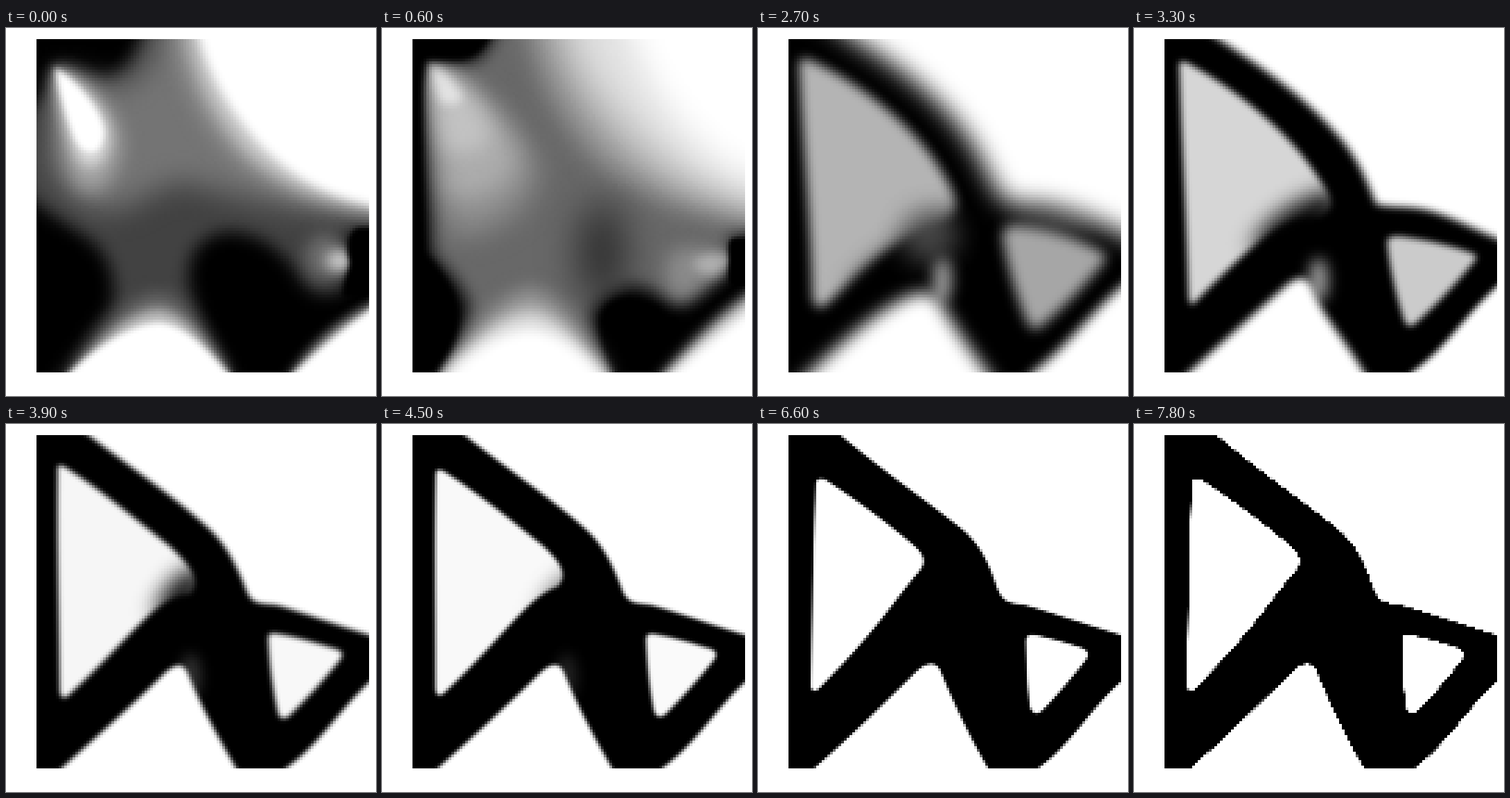
Write an HTML page without scripts that moves like this. It is 534 by 530 pixels and loops after 8000 ms.

```html
<!DOCTYPE html>
<html lang="en">
<head>
<meta charset="utf-8">
<title>Density field settling into a truss</title>
<style>
html, body { margin: 0; width: 100%; height: 100%; overflow: hidden; background: #fff; }
svg { display: block; width: 534px; height: 530px; }
.soft > * { filter: blur(calc(var(--b) * 1px)); }
.truss > *, .early, .start { animation: 8s infinite; }

/* opening fields fade away in hard steps */
.start { animation-name: start; animation-timing-function: step-end; }
@keyframes start { 0% { opacity: 1 } 3.75% { opacity: .42 } 7.5%, 100% { opacity: 0 } }
.early { animation-name: early; animation-timing-function: step-end; }
@keyframes early {
  0%, 7.5% { opacity: 1 } 11.25% { opacity: .93 } 15% { opacity: .88 }
  22.5% { opacity: .65 } 26.25% { opacity: .4 } 30% { opacity: .18 } 33.75%, 100% { opacity: 0 }
}

/* the truss sharpens one step every 300 ms */
.truss > .sky { fill: #fff; animation-name: sky; }
@keyframes sky {
  0%, 33.75% { animation-timing-function: steps(2); filter: blur(18px);
    d: path("M88 -20 L137 16 C206 56 268 106 309 167 C330 202 340 230 354 247 C372 258 388 256 404 255 C442 260 480 273 530 298 L620 340 L620 -60 L88 -60 Z") }
  41.25% { animation-timing-function: steps(2); filter: blur(6px);
    d: path("M80 -12 L120 15 C190 60 242 96 290 150 C323 185 336 220 350 254 C364 259 398 257 420 262 C455 270 490 290 530 306 L620 334 L620 -60 L80 -60 Z") }
  48.75% { animation-timing-function: steps(6); filter: blur(3.5px);
    d: path("M78 -15 L119 16 C190 70 243 105 290 148 C322 176 336 212 350 246 C358 259 366 259 390 261 C430 272 470 288 530 306 L620 330 L620 -60 L78 -60 Z") }
  71.25% { animation-timing-function: steps(7); filter: blur(1.5px);
    d: path("M78 -15 L120 17 C190 75 245 112 290 148 C322 172 335 205 345 235 C354 258 362 258 385 261 C430 274 470 288 530 306 L620 330 L620 -60 L78 -60 Z") }
  97.5%, 100% { filter: blur(.4px);
    d: path("M78 -15 L120 17 C190 75 245 112 290 148 C322 172 335 205 345 235 C354 258 362 258 385 261 C430 274 470 288 530 306 L620 330 L620 -60 L78 -60 Z") }
}
.truss > .big { animation-name: big; }
@keyframes big {
  0%, 33.75% { animation-timing-function: steps(2); filter: blur(8px); fill: #b4b4b4;
    d: path("M60 58 C58 44 66 42 78 48 C150 80 225 143 260 198 C286 240 300 266 265 282 C215 295 172 330 102 396 C90 408 82 404 79 388 C76 270 66 180 60 58 Z") }
  41.25% { animation-timing-function: steps(2); filter: blur(5px); fill: #d6d6d6;
    d: path("M66 60 C64 46 70 48 80 52 C150 90 222 150 259 205 C283 240 298 260 265 271 C215 272 172 312 90 394 C83 402 80 399 79 383 C76 270 70 180 66 60 Z") }
  48.75% { animation-timing-function: steps(6); filter: blur(3.5px); fill: #f6f6f6;
    d: path("M75 70 C74 58 78 58 88 64 C140 97 190 140 235 175 C262 200 285 225 265 245 C215 250 180 310 92 390 C84 398 78 396 78 380 C77 270 74 180 75 70 Z") }
  71.25% { animation-timing-function: steps(7); filter: blur(1.5px); fill: #fff;
    d: path("M84 86 C86 78 93 78 100 82 C150 115 190 145 225 175 C240 188 245 200 232 214 C200 250 175 295 90 380 C84 387 76 386 77 375 C79 270 80 180 84 86 Z") }
  97.5%, 100% { filter: blur(.4px); fill: #fff;
    d: path("M84 86 C86 78 93 78 100 82 C150 115 190 145 225 175 C240 188 245 200 232 214 C200 250 175 295 90 380 C84 387 76 386 77 375 C79 270 80 180 84 86 Z") }
}
.truss > .small { animation-name: small; }
@keyframes small {
  0%, 33.75% { animation-timing-function: steps(2); filter: blur(9px); fill: #a6a6a6;
    d: path("M354 306 C352 284 364 284 380 286 C430 292 470 308 496 322 C506 330 503 336 494 345 C468 376 443 402 412 428 C402 438 394 436 388 422 C376 394 362 350 354 306 Z") }
  41.25% { animation-timing-function: steps(2); filter: blur(5px); fill: #cbcbcb;
    d: path("M366 312 C365 300 374 300 388 301 C425 306 460 314 486 324 C498 328 496 333 488 341 C463 371 438 398 409 424 C400 433 394 431 390 420 C380 390 370 350 366 312 Z") }
  48.75% { animation-timing-function: steps(6); filter: blur(3.5px); fill: #f8f8f8;
    d: path("M379 312 C378 301 384 301 394 303 C425 308 455 318 478 325 C488 329 487 334 482 341 C460 368 435 396 410 420 C402 427 396 426 393 416 C386 385 381 350 379 312 Z") }
  71.25% { animation-timing-function: steps(7); filter: blur(1.5px); fill: #fff;
    d: path("M387 314 C387 304 393 303 404 305 C425 310 448 316 468 323 C478 328 479 333 473 341 C455 364 435 388 411 413 C403 420 397 418 393 408 C389 380 388 350 387 314 Z") }
  97.5%, 100% { filter: blur(.4px); fill: #fff;
    d: path("M387 314 C387 304 393 303 404 305 C425 310 448 316 468 323 C478 328 479 333 473 341 C455 364 435 388 411 413 C403 420 397 418 393 408 C389 380 388 350 387 314 Z") }
}
.truss > .arch { fill: #fff; animation-name: arch; }
@keyframes arch {
  0%, 33.75% { animation-timing-function: steps(2); filter: blur(12px);
    d: path("M40 530 L80 492 C120 456 165 414 208 392 C234 377 254 380 263 395 C280 425 300 455 334 500 L352 530 Z") }
  41.25% { animation-timing-function: steps(2); filter: blur(6px);
    d: path("M46 530 L80 496 C130 452 180 406 222 370 C240 355 251 361 257 375 C271 412 298 440 333 497 L352 530 Z") }
  48.75% { animation-timing-function: steps(6); filter: blur(3px);
    d: path("M46 530 L81 496 C130 452 180 408 230 359 C246 345 255 345 262 358 C278 398 300 440 333 497 L352 530 Z") }
  71.25% { animation-timing-function: steps(7); filter: blur(1.5px);
    d: path("M46 530 L83 495 C130 455 180 405 230 356 C243 344 256 342 263 354 C280 395 300 440 333 497 L352 530 Z") }
  97.5%, 100% { filter: blur(.4px);
    d: path("M46 530 L83 495 C130 455 180 405 230 356 C243 344 256 342 263 354 C280 395 300 440 333 497 L352 530 Z") }
}
.truss > .corner { fill: #fff; animation-name: corner; }
@keyframes corner {
  0%, 33.75% { animation-timing-function: steps(2); filter: blur(8px);
    d: path("M366 530 L400 494 C442 464 482 410 524 374 L600 312 L600 530 Z") }
  41.25% { animation-timing-function: steps(2); filter: blur(4px);
    d: path("M372 530 L402 496 C449 464 481 411 524 373 L600 320 L600 530 Z") }
  48.75% { animation-timing-function: steps(6); filter: blur(3px);
    d: path("M372 530 L405 496 C452 463 482 412 524 373 L600 320 L600 530 Z") }
  71.25% { animation-timing-function: steps(7); filter: blur(1.5px);
    d: path("M372 530 L405 496 C452 463 482 408 524 372 L600 320 L600 530 Z") }
  97.5%, 100% { filter: blur(.4px);
    d: path("M372 530 L405 496 C452 463 482 408 524 372 L600 320 L600 530 Z") }
}

/* soft densities around the struts */
.truss > .shade { filter: blur(16px); animation-name: shade; }
@keyframes shade {
  0%, 33.75% { animation-timing-function: steps(2); opacity: .65; rx: 110px; ry: 24px; transform: translate(225px, 322px) rotate(-33deg) }
  41.25% { animation-timing-function: steps(2); opacity: 1; rx: 74px; ry: 26px; transform: translate(238px, 282px) rotate(-32deg) }
  48.75% { animation-timing-function: steps(6); opacity: 1; rx: 48px; ry: 22px; transform: translate(254px, 246px) rotate(-48deg) }
  71.25%, 100% { opacity: 0; rx: 46px; ry: 20px; transform: translate(285px, 260px) rotate(-48deg) }
}
.truss > .haze { fill: #555; filter: blur(18px); animation-name: haze; }
@keyframes haze {
  0%, 33.75% { animation-timing-function: steps(2); opacity: .8 }
  41.25%, 100% { opacity: 0 }
}
.truss > .glow { fill: #999; filter: blur(10px); animation-name: glow; }
@keyframes glow {
  0%, 41.25% { animation-timing-function: steps(2); opacity: 1 }
  48.75% { animation-timing-function: steps(6); opacity: .35 }
  71.25%, 100% { opacity: 0 }
}
</style>
</head>
<body>
<svg viewBox="0 0 534 530">
  <defs>
    <!-- 4 px cells: sample the middle of each cell, then spread it -->
    <filter id="cells" filterUnits="userSpaceOnUse" x="44" y="16" width="481" height="480" color-interpolation-filters="sRGB">
      <feFlood x="46" y="18" width="1" height="1" flood-color="#000"/>
      <feOffset x="44" y="16" width="4" height="4" dx="0" dy="0"/>
      <feTile result="dots"/>
      <feComposite in="SourceGraphic" in2="dots" operator="in" result="a"/>
      <feOffset in="a" dx="1" result="a1"/>
      <feMerge result="b"><feMergeNode in="a"/><feMergeNode in="a1"/></feMerge>
      <feOffset in="b" dx="-2" result="b2"/>
      <feMerge result="c"><feMergeNode in="b"/><feMergeNode in="b2"/></feMerge>
      <feOffset in="c" dy="1" result="c1"/>
      <feMerge result="d"><feMergeNode in="c"/><feMergeNode in="c1"/></feMerge>
      <feOffset in="d" dy="-2" result="d2"/>
      <feMerge><feMergeNode in="d"/><feMergeNode in="d2"/></feMerge>
    </filter>
  </defs>

  <g filter="url(#cells)">
    <rect width="534" height="530"/>
    <g class="truss">
      <path class="big"/>
      <ellipse class="shade"/>
      <ellipse class="haze" cx="248" cy="300" rx="42" ry="40"/>
      <ellipse class="haze" cx="425" cy="284" rx="62" ry="16"/>
      <path class="sky"/>
      <path class="small"/>
      <ellipse class="glow" cx="267" cy="364" rx="14" ry="32"/>
      <path class="arch"/>
      <path class="corner"/>
    </g>

    <g class="early">
      <rect width="534" height="530"/>
      <g class="soft">
        <path style="--b:12" fill="#686868" d="M172 -30C160 40 140 52 100 56L70 52C70 150 76 250 72 325C92 350 122 372 126 408C115 450 100 475 70 520H345C320 470 306 440 302 420C308 385 340 372 365 370C400 378 425 405 440 398L505 348V296L580 288V-30Z"/>
        <path style="--b:18" fill="#8c8c8c" d="M202 -30C215 60 250 140 320 205C380 250 450 274 580 284V-30Z"/>
        <path style="--b:20" fill="#b8b8b8" d="M232 -30C245 50 280 120 350 186C410 232 470 258 580 274V-30Z"/>
        <path style="--b:22" fill="#e0e0e0" d="M265 -30C280 50 325 110 390 170C440 214 490 238 580 260V-30Z"/>
        <path style="--b:24" fill="#fff" d="M345 -40C365 50 400 110 450 160C490 200 520 218 600 235V-40Z"/>
        <path style="--b:20" fill="#8e8e8e" d="M72 56C130 80 205 140 225 200C228 250 170 300 100 300C80 250 76 150 72 56Z"/>
        <path style="--b:17" fill="#acacac" d="M70 54C120 75 180 130 196 190C190 230 140 252 96 245C82 190 78 120 70 54Z"/>
        <path style="--b:14" fill="#c2c2c2" d="M70 53C110 72 150 120 158 160C140 185 110 185 92 175C82 130 76 90 70 53Z"/>
        <path style="--b:7" fill="#e2e2e2" d="M68 50C90 62 112 84 118 104C108 112 95 112 86 108C78 90 74 70 68 50Z"/>
        <ellipse style="--b:28" fill="#2c2c2c" cx="318" cy="325" rx="34" ry="75"/>
        <path style="--b:13" fill="#8a8a8a" d="M504 334C470 310 430 312 412 330C408 360 415 385 428 392C455 380 480 355 504 334Z"/>
        <path style="--b:8" fill="#b0b0b0" d="M506 334C485 320 462 326 448 338C455 352 468 358 482 356Z"/>
        <path style="--b:5" d="M314 420C316 398 335 388 355 386C385 388 415 410 424 438C424 460 412 480 400 520H340C325 480 312 450 314 420Z"/>
        <path style="--b:14" fill="#9c9c9c" d="M85 505C130 440 160 390 215 376C260 385 290 440 330 505Z"/>
        <path style="--b:10" fill="#dcdcdc" d="M78 510C130 450 170 414 215 408C260 414 290 460 334 510Z"/>
        <path style="--b:9" fill="#fff" d="M78 515C130 465 170 438 215 434C260 438 290 470 334 515Z"/>
        <path style="--b:9" fill="#c4c4c4" d="M402 505C450 452 490 405 580 350V540H390Z"/>
        <path style="--b:8" fill="#fff" d="M398 515C450 468 500 425 580 372V540H390Z"/>
        <path style="--b:2.5" d="M580 303H508C499 305 500 318 501 334C500 350 498 365 506 372H580Z"/>
        <path style="--b:5" d="M20 0H160C150 40 125 49 95 48L64 46C56 80 60 200 64 325C90 352 112 385 112 420C110 450 98 470 76 500H20Z"/>
      </g>
    </g>

    <g class="start">
      <rect width="534" height="530"/>
      <g class="soft">
        <path style="--b:12" fill="#424242" d="M208 -30C195 50 165 80 130 74L72 58C66 90 52 105 20 130V236C60 266 95 286 125 308C154 335 160 365 154 402L60 530H345C300 470 280 430 264 370C260 315 290 298 320 294C370 294 405 326 425 360C440 388 470 390 494 372V292L580 282V-30Z"/>
        <path style="--b:21" fill="#747474" d="M230 -30C215 60 185 92 140 82L78 64C78 120 66 150 62 190C76 235 110 258 140 264C190 264 215 225 260 222C330 244 420 270 580 270V-30Z"/>
        <path style="--b:17" fill="#a0a0a0" d="M244 -30C250 60 280 130 340 190C400 235 460 258 580 266V-30Z"/>
        <path style="--b:12" fill="#d0d0d0" d="M260 -30C270 60 300 120 352 180C402 225 460 255 580 266V-30Z"/>
        <path style="--b:7" fill="#fff" d="M271 -30C283 50 315 110 370 170C420 218 460 246 580 266V-30Z"/>
        <path style="--b:14" fill="#a4a4a4" d="M72 57C110 70 168 120 168 170C162 220 130 250 105 230C80 200 76 130 72 57Z"/>
        <path style="--b:9" fill="#dadada" d="M72 58C105 75 152 120 150 160C145 205 115 210 102 185C88 150 78 110 72 58Z"/>
        <path style="--b:4" fill="#fff" d="M71 57C100 76 139 118 142 150C140 190 110 185 100 160C88 130 80 100 71 57Z"/>
        <ellipse style="--b:12" fill="#707070" cx="460" cy="330" rx="26" ry="32"/>
        <ellipse style="--b:9" fill="#cacaca" cx="482" cy="336" rx="19" ry="16"/>
        <path style="--b:13" fill="#727272" d="M100 500C150 420 185 387 222 385C255 387 285 440 320 500Z"/>
        <path style="--b:8" fill="#c2c2c2" d="M92 505C140 440 185 410 220 407C258 410 290 455 324 505Z"/>
        <path style="--b:4" fill="#fff" d="M84 505C130 460 180 427 220 425C260 427 290 465 328 505Z"/>
        <path style="--b:8" fill="#a8a8a8" d="M408 505C450 446 490 412 580 374V540H390Z"/>
        <path style="--b:4" fill="#fff" d="M408 505C455 460 500 420 580 372V540H390Z"/>
        <path style="--b:3" d="M580 288H508C494 294 490 318 496 335C498 350 484 365 488 388L580 380Z"/>
      </g>
    </g>
  </g>
</svg>
</body>
</html>
```
